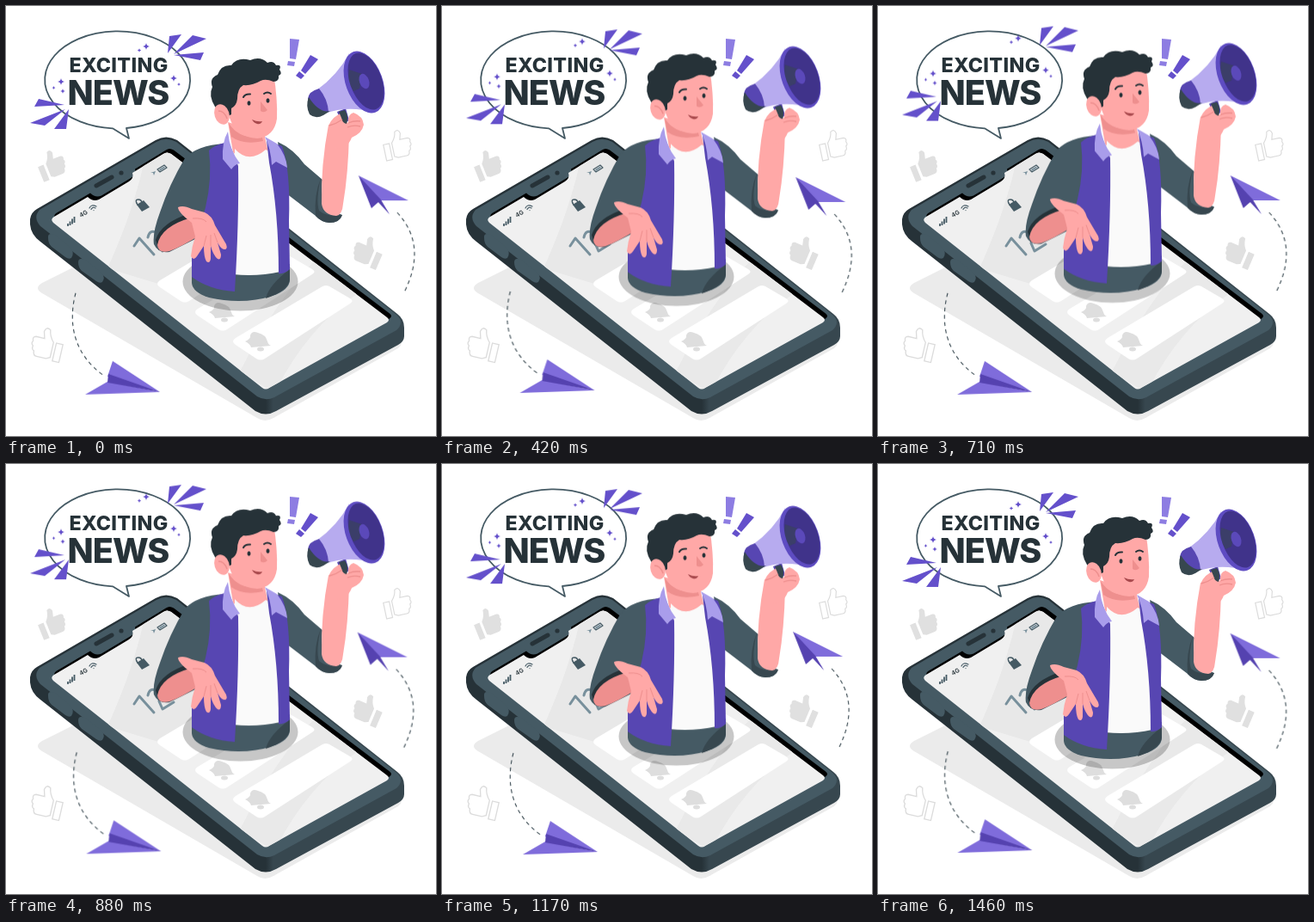
Write an HTML page without scripts that moves like this. It is 500 px wide and 500 px high and loops after 1500 ms.

```html
<!DOCTYPE html>
<html lang="en">
<head>
<meta charset="utf-8">
<title>Exciting news</title>
<style>
html, body { margin: 0; width: 100%; height: 100%; overflow: hidden; background: #fff; }
svg { display: block; width: 100vw; height: 100vh; }
text { font-family: Inter, Roboto, sans-serif; fill: #263238; }
.title { font-weight: 800; text-anchor: middle; }
.bob, .drift { animation: bob 750ms cubic-bezier(.37, 0, .63, 1) infinite alternate; }
.drift { animation-name: drift; animation-delay: -1150ms; }
@keyframes bob { to { transform: translateY(-9.5px); } }
@keyframes drift {
  from { transform: translate(var(--ax), var(--ay)); }
  to { transform: translate(var(--bx), var(--by)); }
}
.right { --ax: 1.3px; --ay: 2px; --bx: -2px; --by: -2.2px; }
.left { --ax: -1.7px; --ay: -2.2px; --bx: 2px; --by: 2.2px; }
.trail { fill: none; stroke: #37474f; stroke-width: 1.1; stroke-dasharray: 4.5 4; }
.dark { fill: #263238; }
.slate { fill: #455a64; }
.skin { fill: #ffa8a7; }
.shade { fill: #ee8f8e; }
.vest { fill: #5746b2; }
.ray { fill: #6450cb; }
.wing { fill: #7f6cdb; }
.fold { fill: #5542b0; }
.collar { fill: #a99deb; }
.line { fill: none; stroke: #455a64; stroke-linecap: round; stroke-linejoin: round; }
</style>
</head>
<body>
<svg viewBox="0 0 500 500">
  <defs>
    <g id="thumb">
      <path d="M-16-3h7v19h-7z"/>
      <path d="M-6-3Q-1-8 0-15Q5-18 6-12L4-5H13Q17-4 15 0Q17 3 14 5Q15 9 12 10Q12 15 8 15H-2L-6 13Z"/>
    </g>
    <path id="star" d="M0-4Q.5-.5 4 0Q.5.5 0 4Q-.5.5-4 0Q-.5-.5 0-4Z"/>
    <path id="card" d="M267 386L368 326Q372 324 376 326L400 340Q405 343 400 346L301 410Q296 413 291 410L267 394Q261 390 267 386Z"/>
    <g id="bell">
      <path d="M-15 0Q-8-3-9-7Q-7-13 0-10Q9-8 11 0Q12 4 15 5L-8 7Q-9 3-15 0Z"/>
      <ellipse cx="3" cy="9" rx="4" ry="2.5"/>
    </g>
    <path id="glass" d="M56 245L95 222Q101 228 108 225L143 204Q149 200 147 194L183 172Q187 169 192 172L443 362Q447 365 443 368L306 444Q302 447 298 444L55 252Q51 248 56 245Z"/>
    <clipPath id="screen"><use href="#glass"/></clipPath>
    <linearGradient id="side"><stop offset=".63" stop-color="#263238"/><stop offset=".65" stop-color="#37474f"/></linearGradient>
  </defs>

  <!-- thumbs -->
  <g fill="#e0e0e0">
    <use href="#thumb" transform="translate(53 184) rotate(-22)"/>
    <use href="#thumb" transform="translate(421 285) rotate(23) scale(-1.05 1.05)"/>
  </g>
  <g fill="#fff" stroke="#dcdcdc" stroke-width="1.2">
    <use href="#thumb" transform="translate(455 161) rotate(-12)"/>
    <use href="#thumb" transform="translate(48 393) rotate(13) scale(-1.12 1.12)"/>
  </g>

  <!-- phone -->
  <path fill="#ebebeb" d="M80 303L42 322Q32 328 42 334L292 479Q301 485 311 479L456 398Q463 393 458 385L400 340Z"/>
  <path fill="url(#side)" d="M36 236L174 156Q186 149 199 156L455 358Q463 364 463 374V384Q463 390 456 394L314 471Q302 478 290 471L40 274Q29 266 28 254V248Q29 240 36 236Z"/>
  <path class="slate" d="M39 237L175 158Q186 152 198 158L454 359Q464 368 454 377L312 455Q302 460 292 454L40 256Q31 246 39 237Z"/>
  <g class="slate">
    <path d="M49 270Q48 263 57 266L75 281Q80 287 76 293Q73 295 69 292L53 280Q49 276 49 270Z"/>
    <path d="M84 298Q84 292 92 295L111 310Q116 316 112 321Q109 323 105 320L88 308Q84 304 84 298Z"/>
  </g>
  <use href="#glass" transform="translate(3 -4.500)"/>
  <use href="#glass" fill="#f0f0f0"/>
  <g clip-path="url(#screen)">
    <path fill="#e8e8e8" d="M163 170L200 160L290 240L200 330L118 305Q150 235 163 170Z"/>
    <path fill="#e9e9e9" d="M360 295L408 335Q350 375 312 450L272 425Q315 340 360 295Z"/>
    <g fill="#fff">
      <use href="#card"/><use href="#card" x="-44" y="-34"/><use href="#card" x="-88" y="-67"/>
    </g>
  </g>
  <g fill="#dedede">
    <use href="#bell" transform="translate(293 390)"/>
    <use href="#bell" transform="translate(251 356)"/>
  </g>
  <path class="line" style="stroke:#263238" stroke-width="5" d="M105 209L123 199"/>
  <circle class="dark" cx="134" cy="194" r="2.6"/>
  <path class="line" style="stroke-linecap:butt" stroke-width="1.8" d="M72 256v-3M74.500 255v-4.500M77 253.500v-6M79.500 252v-7"/>
  <text font-size="7" font-weight="600" transform="translate(87 246) rotate(-30)">4G</text>
  <g class="line" stroke-width="1.2">
    <path d="M97 235Q99 230 105 233M99 236.500Q101 233 104 235M102 237.500v.1"/>
    <path d="M176 190L184 185L187 188L179 193Z"/>
  </g>
  <path fill="#78909c" d="M168 194L174 192L172 197L171 194ZM178 190L184 186.500L185 188L179 192Z"/>
  <path class="slate" d="M152 231L160 226L167 234L158 239Z"/>
  <path class="line" stroke-width="1.4" d="M153 231Q149 225 154 225Q157 225 158 228"/>
  <path class="line" style="stroke:#78909c" stroke-width="3" d="M149 279L155 270L172 289M165 269Q167 260 174 263Q181 267 178 276L182 285L195 277"/>

  <!-- speech bubble -->
  <path fill="#fff" stroke="#455a64" stroke-width="1.8" stroke-linejoin="round" d="M124 142.300A84.500 56.500 0 1 1 140 142L143 154Z"/>
  <text class="title" x="131" y="76.500" font-size="23.300" letter-spacing=".35">EXCITING</text>
  <text class="title" x="130.500" y="115" font-size="39.500" letter-spacing="-1">NEWS</text>
  <g class="bob">
    <path class="ray" d="M38 108L68 115L33 117ZM28 136L69 120L45 139ZM73 120L56 143L70 143ZM188 55L190 35L204 33ZM195 56L217 34L233 38ZM195 57L230 54L226 63Z"/>
    <g class="ray">
      <use href="#star" x="64" y="88"/><use href="#star" x="163" y="47"/><use href="#star" x="195" y="84"/>
      <use href="#star" transform="translate(55.500 95) scale(.5)"/>
      <use href="#star" transform="translate(66 99) scale(.7)"/>
      <use href="#star" transform="translate(155 51.500) scale(.55)"/>
      <use href="#star" transform="translate(201 91) scale(.5)"/>
    </g>
  </g>

  <!-- exclamation marks -->
  <path fill="#8d7de2" d="M330 38L341 39L337 62L330 61ZM328 64L336 65L335 70L327 69Z"/>
  <path class="ray" d="M354 57L363 62L348 79L343 75ZM341 76L347 81L343 85L337 81Z"/>

  <!-- paper planes -->
  <g class="drift right">
    <path class="trail" d="M455 240C478 265 482 295 463 333"/>
    <path class="wing" d="M410 197L468 226L436 226ZM410 197L446 242L436 226Z"/>
    <path class="fold" d="M410 197L425 235L433 228L446 242L436 225Z"/>
  </g>
  <g class="drift left">
    <path class="trail" d="M81 334C72 368 78 405 114 430"/>
    <path class="wing" d="M124 413L179 449L118 431ZM92 452L118 437L179 449Z"/>
    <path class="fold" d="M119 428L179 449L118 438Z"/>
  </g>

  <!-- announcer -->
  <g class="bob">
    <ellipse cx="272.500" cy="320.500" rx="67" ry="34" opacity=".22"/>
    <path class="slate" d="M216 300V322Q217 333 236 339Q275 348 310 337Q330 330 330 318V300Z"/>
    <path fill="#37474f" d="M330 306V318Q328 331 302 340Q306 324 330 306Z"/>

    <path class="slate" d="M316 158Q334 166 347 184L368 202Q362 232 391 243Q388 252 376 252Q366 251 360 244L326 218Z"/>
    <path fill="#37474f" d="M366 200Q360 226 364 238Q374 246 391 243Q388 252 376 252Q366 251 360 244Q358 220 366 200Z"/>
    <path class="skin" d="M375 138Q366 185 367 230Q369 243 384 244Q391 243 392 230Q398 195 399 148Z"/>

    <path class="skin" d="M258 135L264 170Q285 192 305 170L300 148Z"/>
    <path class="shade" d="M259 136Q270 155 298 153L299 157Q276 162 262 152Z"/>
    <path fill="#fafafa" d="M266 166Q282 184 302 167L312 172Q322 230 319 309Q292 315 264 312Z"/>
    <path class="slate" d="M254 160Q222 162 208 177Q190 207 179 240Q170 264 172 277Q177 288 190 286L222 270L246 240L252 165Z"/>
    <path class="vest" d="M254 159Q242 162 236 168Q240 200 232 234L216 290V315Q236 330 266 332Q271 250 270 186L259 158Z"/>
    <path class="vest" d="M303 156L321 163Q331 190 329 250L330 306Q324 312 317 311Q317 240 306 182Z"/>
    <path class="collar" d="M258 146Q251 158 252 178L262 190Q266 184 272 183Q260 168 258 146Z"/>
    <path class="collar" d="M301 152L315 160Q326 174 327 188L314 181L309 185Q308 166 301 152Z"/>

    <path class="dark" d="M174 272Q180 252 214 241L219 247Q190 257 178 284Z"/>
    <path class="shade" d="M176 278Q180 256 216 246L226 266Q204 280 190 285Q177 288 176 278Z"/>
    <path class="skin" d="M200 234Q206 231 216 236L231 240Q240 244 243 255L256 277Q258 283 254 283Q250 283 246 275L250 289Q250 296 246 294Q241 290 238 279V294Q237 300 233 297Q230 292 230 279L222 291Q218 297 215 291Q216 280 220 268L216 252Q200 240 200 234Z"/>
    <path fill="none" stroke="#ee8f8e" d="M217 247Q229 246 233 251M230 279L233 267M238 279L238 266M246 275L242 264"/>

    <path class="skin" d="M261 90L260 130Q267 152 292 154Q312 152 315 131Q316 108 311 78Q290 72 261 90Z"/>
    <path class="dark" d="M243 117Q235 104 240 94Q236 84 246 80Q250 68 262 69Q269 59 284 63Q296 58 304 66Q311 63 314 69Q321 68 318 74Q322 79 317 81Q318 88 311 88Q302 84 296 87Q286 93 276 92Q269 96 269 108Q268 116 262 119V126L255 130Z"/>
    <ellipse class="skin" cx="251" cy="126" rx="8.500" ry="12" transform="rotate(-18 251 126)"/>
    <path fill="none" stroke="#ee8f8e" stroke-width="1.500" d="M247 122Q254 122 257 131"/>
    <ellipse class="dark" cx="282.500" cy="113" rx="2" ry="2.700"/>
    <ellipse class="dark" cx="304.500" cy="110" rx="2" ry="2.700"/>
    <path fill="none" stroke="#263238" stroke-width="2" stroke-linecap="round" d="M276 106Q278 102 284 102.500M300 102Q304 99 308 102"/>
    <path class="shade" d="M296 111L304 121Q300 125 296 122Z"/>
    <path fill="#a9494d" d="M286 132Q292 135 298 134Q296 138 292 137Q288 136 286 132Z"/>

    <!-- megaphone -->
    <path class="vest" d="M385 123L395 119L399 133L391 138Z"/>
    <path fill="#b7abef" d="M399 55Q386 80 361 98L370 125Q400 115 427 124Z"/>
    <path class="vest" d="M364 96Q352 99 351 108Q354 123 362 126L375 123Q374 108 364 96Z"/>
    <path fill="#37474f" d="M352 106Q348 116 353 126Q360 132 369 127L377 122Q364 125 352 106Z"/>
    <ellipse fill="#5e4cc2" cx="416.500" cy="88.500" rx="21.500" ry="37.500" transform="rotate(-20 416.500 88.500)"/>
    <ellipse fill="#40338a" cx="418.500" cy="87.500" rx="18.500" ry="34.500" transform="rotate(-20 418.500 87.500)"/>
    <path fill="#37474f" opacity=".55" d="M399 74L414 79L411 96L404 99Q396 86 399 74Z"/>
    <ellipse fill="#5b49ba" cx="416.500" cy="87.500" rx="5.500" ry="9" transform="rotate(-20 416.500 87.500)"/>

    <path class="skin" d="M375 139Q380 128 391 124Q395 127 392 133L398 136Q397 126 404 124Q415 128 416 138Q414 148 402 153Q397 166 384 166Z"/>
    <path fill="#37474f" d="M387 123L394 121Q399 128 396 137Q391 136 390 130Z"/>
    <path fill="none" stroke="#ee8f8e" stroke-width="1.300" d="M376 139Q384 137 391 132M398 136Q405 133 412 134M397 141Q404 138 412 140"/>
  </g>
</svg>
</body>
</html>
```
